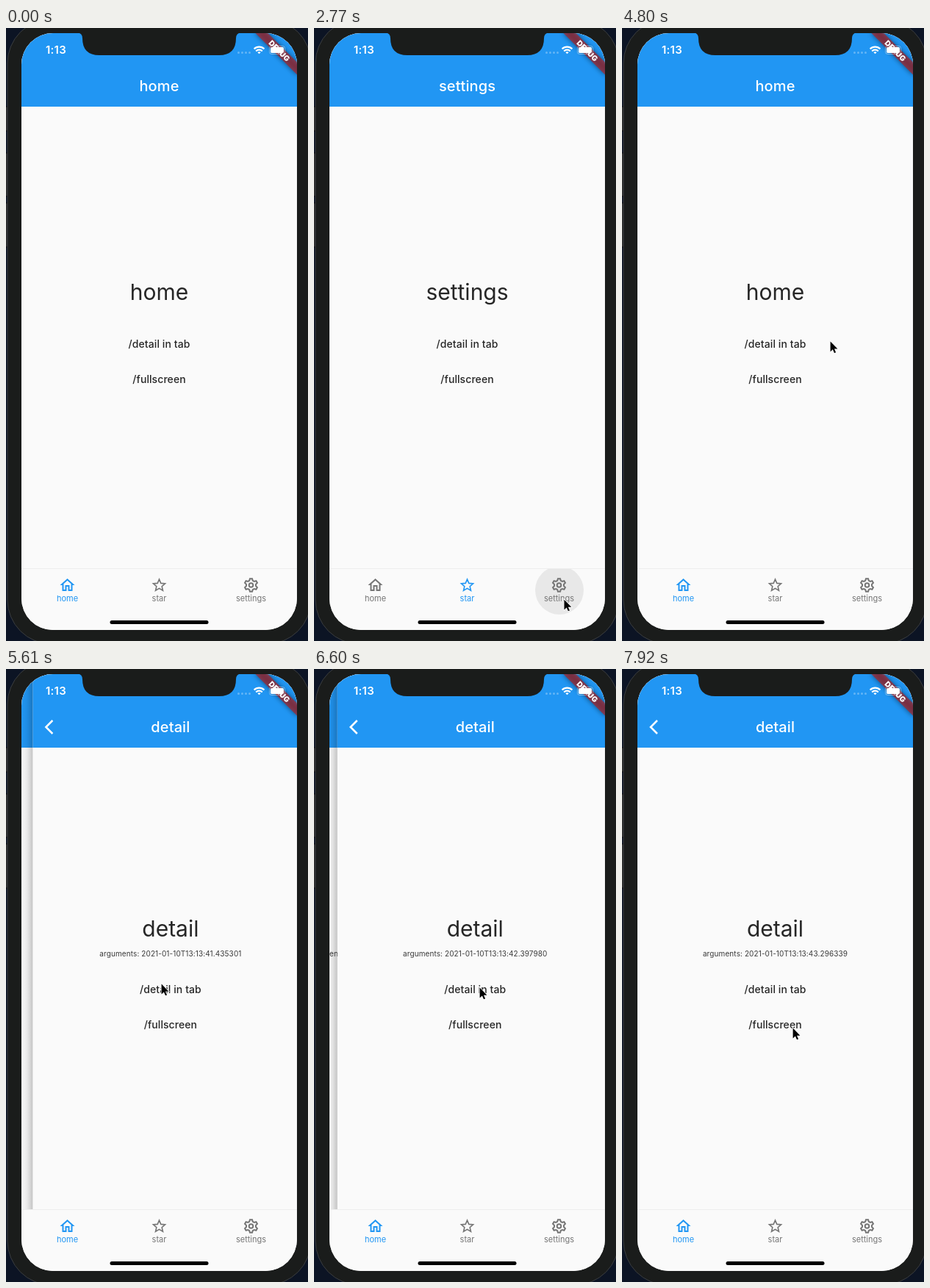
Recreate the animation shown at these times as an HTML page. Size 411 by 834 pixels, loop 8000 ms.

```html
<!DOCTYPE html>
<html lang="en">
<head>
<meta charset="utf-8">
<title>Tab navigation</title>
<style>
  html, body { margin: 0; width: 100%; height: 100%; overflow: hidden; background: #0c1424; }
  svg { display: block; width: 100%; height: 100%; }
  text { font-family: Inter, Roboto, sans-serif; text-anchor: middle; }
  .title { font-size: 20px; font-weight: 500; letter-spacing: .1px; fill: #fff; }
  .big { font-size: 30px; fill: #262626; }
  .link { font-size: 14px; font-weight: 500; letter-spacing: .08px; fill: #262626; }
  .args { font-size: 10px; letter-spacing: .1px; fill: #3a3a3a; }
  .tab text { font-size: 11px; }
  .clock { font-size: 15px; font-weight: 600; letter-spacing: .3px; fill: #fff; }
  .debug { font-size: 10.2px; font-weight: 900; fill: #fff; }
</style>
</head>
<body>
<svg viewBox="0 0 411 834" preserveAspectRatio="none">
  <defs>
    <clipPath id="screenClip"><rect x="21" y="7" width="375" height="812" rx="43"/></clipPath>
    <clipPath id="pageClip"><rect x="21" y="7" width="375" height="729"/></clipPath>
    <clipPath id="barClip"><rect x="21" y="736" width="375" height="83"/></clipPath>
    <linearGradient id="edge">
      <stop offset="0" stop-opacity="0"/>
      <stop offset=".3" stop-opacity=".016"/>
      <stop offset=".6" stop-opacity=".07"/>
      <stop offset="1" stop-opacity=".22"/>
    </linearGradient>
    <filter id="blur" x="-20%" y="-150%" width="140%" height="400%"><feGaussianBlur stdDeviation="3.5"/></filter>
  </defs>

  <!-- phone body -->
  <g fill="#2a2b2b" stroke="#000">
    <rect x="-3" y="107" width="7" height="33"/>
    <rect x="-3" y="170" width="7" height="59"/>
    <rect x="-3" y="238" width="7" height="60"/>
  </g>
  <rect x="2" y="-12" width="413" height="850" rx="60" fill="#1a1c1b" stroke="#3a3d40"/>

  <g clip-path="url(#screenClip)">
    <rect x="21" y="7" width="375" height="812" fill="#fafafa"/>
    <g id="pages" clip-path="url(#pageClip)"></g>
    <rect x="21" y="735" width="375" height="84" fill="#fafafa"/>
    <rect x="21" y="735" width="375" height="1" fill="#eee"/>
    <g clip-path="url(#barClip)"><circle id="ripple" cy="765" r="33"/></g>
    <g id="tabs"></g>
    <rect x="141.5" y="806" width="134" height="5" rx="2.5"/>

    <g transform="translate(396 7) rotate(45)">
      <rect x="-40" y="28" width="80" height="12" opacity=".5" filter="url(#blur)"/>
      <rect x="-40" y="28" width="80" height="12" fill="#b71c1c" fill-opacity=".627"/>
      <text class="debug" y="37.7">DEBUG</text>
    </g>
  </g>
  <path d="M97 6Q104 7 104 14Q104 37 127 37H290Q313 37 313 14Q313 7 320 6Z" fill="#1a1c1b"/>

  <!-- status bar -->
  <text class="clock" x="68" y="35.3">1:13</text>
  <g fill="none" stroke="#fff">
    <path d="M316.500 33.500H332" stroke-width="3" stroke-dasharray="0 5" stroke-linecap="round" stroke-opacity=".3"/>
    <g stroke-width="2.2">
      <path d="M337.6 28.6A9.7 9.7 0 0 1 351.4 28.600"/>
      <path d="M340.2 31.4A6 6 0 0 1 348.8 31.400"/>
    </g>
    <path d="M342.3 33L344.5 35.3 346.7 33Q344.5 31.3 342.3 33Z" fill="#fff" stroke="none"/>
    <rect x="358.500" y="24.500" width="21" height="11" rx="3" stroke-opacity=".4"/>
  </g>
  <rect x="360" y="26" width="18" height="8" rx="1.7" fill="#fff"/>

  <g id="cursor">
    <path d="M0 0V16L3.7 12.5 6.2 18 8.6 17 6.2 11.6H11.3Z" transform="translate(.6 .6) scale(.87)"
      stroke="#fff" stroke-width="1.7" paint-order="stroke"/>
  </g>
</svg>

<script>
const DURATION = 8000;
const TICK = DURATION / 90;
const $ = id => document.getElementById(id);
const clamp = v => Math.min(1, Math.max(0, v));
const tabNames = ['home', 'star', 'settings'];

const taps = [[1785, 1], [2765, 2], [3830, 1], [4540, 0]];
const pushes = [
  [5366, '13:13:41.435301'], [6320, '13:13:42.397980'], [7205, '13:13:43.296339']
];
const entry = { time: 810, at: [359, 242] };
const moves = [
  { from: 810, until: 1530, to: [205, 768], bend: [350, 700] },
  { from: 1785, until: 2420, to: [340, 777] },
  { from: 2765, until: 3560, to: [206, 771], bend: [300, 795] },
  { from: 3830, until: 4010, to: [86, 775] },
  { from: 4540, until: 5160, to: [211, 428], bend: [406, 342] },
  { from: 5610, until: 5790, to: [225, 433] },
  { from: 7400, until: 7920, to: [232, 488], bend: [290, 510] }
];

function page(title, args) {
  const shift = args ? 6 : 0;
  const line = (cls, y, text) => `<text class="${cls}" x="208.5" y="${y}">${text}</text>`;
  const extras = args
    ? `<path d="M48 70L39 79 48 88" fill="none" stroke="#fff" stroke-width="2.5"/>
       <rect class="shade" x="2" y="7" width="19" height="729" fill="url(#edge)"/>` +
      line('args', 391, `arguments: 2021-01-10T${args}`)
    : '';
  return `<g><rect x="21" y="7" width="375" height="729" fill="#fafafa"/>
    <rect x="21" y="7" width="375" height="100" fill="#2196f3"/>` +
    line('title', 86, title) + line('big', 370 - shift, title) +
    line('link', 435 + shift, '/detail in tab') + line('link', 483 + shift, '/fullscreen') +
    extras + '</g>';
}

// Closed outline that repeats [degrees, radius] corners around a centre.
function radial(count, corners, cy) {
  const points = [];
  for (let i = 0; i < count; i++)
    for (const [offset, r] of corners) {
      const a = (i * 360 / count + offset) * Math.PI / 180;
      points.push((12 + r * Math.sin(a)).toFixed(2) + ' ' + (cy - r * Math.cos(a)).toFixed(2));
    }
  return `<path d="M${points.join('L')}Z"/>`;
}

const outline = (width, shapes) =>
  `<g fill="none" stroke="currentColor" stroke-width="${width}">${shapes}</g>`;
const icons = [
  '<path d="M12 5.7l5 4.5V18h-2v-6H9v6H7v-7.8l5-4.5M12 3L2 12h3v8h6v-6h2v6h6v-8h3L12 3z"/>',
  outline(1.6, radial(5, [[0, 8.45], [36, 3.85]], 12.5)),
  outline(2, radial(6, [[-20, 6.6], [-10, 9], [10, 9], [20, 6.6]], 12) + '<circle cx="12" cy="12" r="2.8"/>')
];
const tabX = i => 83.5 + 125 * i;

$('pages').innerHTML = tabNames.map(name => page(name)).join('') +
  pushes.map(([, stamp]) => page('detail', stamp)).join('');
$('tabs').innerHTML = tabNames.map((name, i) => `<g class="tab" fill="currentColor">
  <g transform="translate(${tabX(i) - 12} 746)">${icons[i]}</g>
  <text x="${tabX(i)}" y="780">${name}</text></g>`).join('');
const pages = [...$('pages').children];
const tabs = [...$('tabs').children];

// The screen refreshes at a fixed, low rate.
const snap = t => Math.floor((t + 2) / TICK) * TICK + 10;

// cubic-bezier(.35, .91, .33, .97)
function slideEase(x) {
  if (x <= 0 || x >= 1) return clamp(x);
  const bez = (u, a, b) => 3 * (1 - u) ** 2 * u * a + 3 * (1 - u) * u * u * b + u ** 3;
  let lo = 0, hi = 1;
  for (let i = 0; i < 24; i++) {
    const mid = (lo + hi) / 2;
    if (bez(mid, .35, .33) < x) lo = mid; else hi = mid;
  }
  return bez(lo, .91, .97);
}

function drawCursor(t) {
  let pos = entry.at;
  for (const { from, until, to, bend } of moves) {
    if (t < from) break;
    const u = 1 - (1 - clamp((t - from) / (until - from))) ** 2;
    pos = pos.map((start, i) => {
      const control = bend ? bend[i] : (start + to[i]) / 2;
      return (1 - u) ** 2 * start + 2 * u * (1 - u) * control + u * u * to[i];
    });
  }
  $('cursor').setAttribute('visibility', t < entry.time ? 'hidden' : 'visible');
  $('cursor').setAttribute('transform', `translate(${pos})`);
}

function drawTabs(t) {
  const done = [[-DURATION, 0], [-DURATION, 0], ...taps.filter(tap => tap[0] <= t)];
  const [[, previous], [tapTime, current]] = done.slice(-2);
  const age = t - tapTime;
  const k = clamp(age / 200);
  const mix = k * k * (3 - 2 * k);
  tabs.forEach((tab, i) => {
    const on = i === current ? mix : i === previous ? 1 - mix : 0;
    const channel = (grey, blue) => Math.round(grey + (blue - grey) * on);
    tab.style.color = `rgb(${channel(117, 33)},${channel(117, 150)},${channel(117, 243)})`;
  });
  $('ripple').setAttribute('cx', tabX(current) + 0.5);
  $('ripple').setAttribute('fill-opacity', 0.072 * clamp(1 - age / 250));
  return current;
}

function drawPages(t, tab) {
  const depth = pushes.filter(p => p[0] <= t).length;
  const stack = [tab, 3, 4, 5];
  let progress = 1;
  if (depth) {
    const age = t - pushes[depth - 1][0];
    // the first rendered frame lingers while the route is built
    progress = slideEase((age < 80 ? 14 : age) / 400);
  }
  pages.forEach((el, i) => {
    const front = i === stack[depth];
    const back = depth > 0 && progress < 1 && i === stack[depth - 1];
    el.setAttribute('visibility', front || back ? 'visible' : 'hidden');
    el.setAttribute('transform', `translate(${front ? 375 * (1 - progress) : -125 * progress} 0)`);
    const shade = el.querySelector('.shade');
    if (shade) shade.setAttribute('opacity', front ? progress : 0);
  });
}

function frame(now) {
  const t = snap(now % DURATION);
  drawPages(t, drawTabs(t));
  drawCursor(t);
  requestAnimationFrame(frame);
}
frame(0);
</script>
</body>
</html>
```
